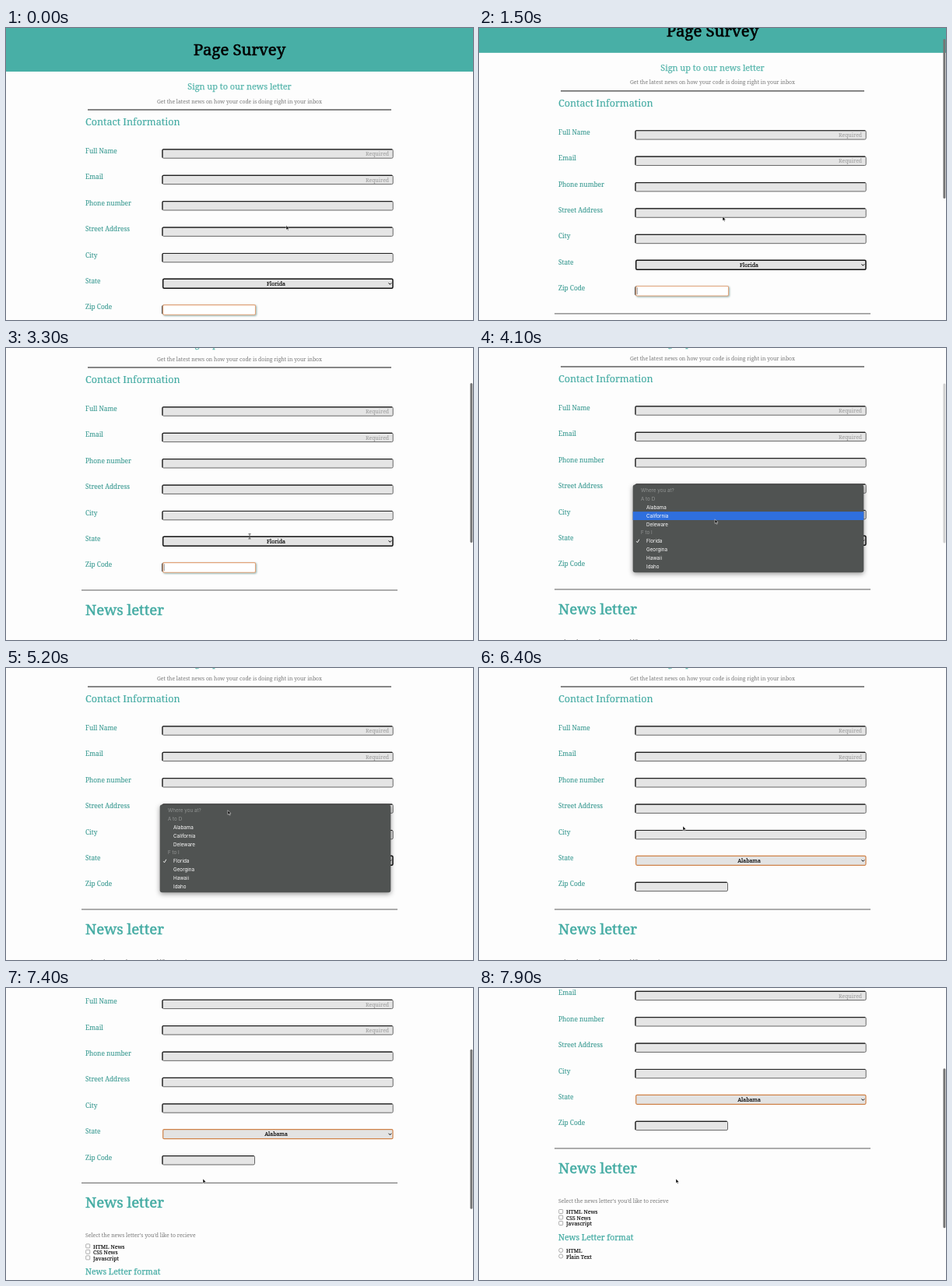
Write an HTML page that moves like this. It is 600 by 375 pixels and loops after 8000 ms.

```html
<!DOCTYPE html>
<html lang="en">
<head>
<meta charset="utf-8">
<title>Newsletter form</title>
<style>
html, body { margin: 0; width: 100%; height: 100%; overflow: hidden; background: #fdfdfd; }
svg { display: block; width: 600px; height: 375px; }
text { font-family: "Noto Serif", serif; white-space: pre; }
#menu text { font-family: Inter, Roboto, sans-serif; font-size: 6.3px; }
#menu > rect:first-child { filter: drop-shadow(0 2px 3px #0006); }
#focus > rect:first-child { filter: drop-shadow(1px 1px 1px #2f6f6a88); }
</style>
</head>
<body>
<svg id="stage" viewBox="0 0 600 375"></svg>
<script>
const TEAL = '#46aca4', LABEL = '#3a9a92', GRAY = '#777';
const LOOP = 8000, ROW = 33.4, MENU_TOP = 177.6, MENU_ROW = 10.85;

const text = (x, y, size, fill, str, { anchor = 'start', weight = 0, id = '' } = {}) =>
  `<text id="${id}" x="${x}" y="${y}" font-size="${size}" fill="${fill}" text-anchor="${anchor}"
    stroke="${fill}" stroke-width="${weight}">${str}</text>`;
const rect = (x, y, w, h, attrs) => `<rect x="${x}" y="${y}" width="${w}" height="${h}" ${attrs}/>`;

// Inset field: darker on the top and left edges
const field = (y, right) =>
  rect(200.9, y + .5, right - 201.4, 11.4, 'rx="1.6" fill="#e5e5e5" stroke="#666" stroke-width="1"') +
  `<path d="M201 ${y + 11.3}V${y + 1.8}Q201 ${y + .6} 202.2 ${y + .6}H${right - 1.5}"
    fill="none" stroke="#222" stroke-width="1.2"/>`;

const labels = ['Full Name', 'Email', 'Phone number', 'Street Address', 'City', 'State', 'Zip Code'];

function page() {
  const mid = { anchor: 'middle' };
  let s = rect(0, 0, 600, 56, `fill="#48afa6"`) +
    text(300, 35, 20.3, '#000', 'Page Survey', { ...mid, weight: .6 }) +
    text(300, 79.4, 10.9, '#58b6ad', 'Sign up to our news letter', { ...mid, weight: .25 }) +
    text(300, 96.6, 6.83, GRAY, 'Get the latest news on how your code is doing right in your inbox', mid) +
    rect(105, 104.3, 390, 1.4, 'fill="#555"') +
    text(102, 125, 12.55, TEAL, 'Contact Information', { weight: .15 });

  labels.forEach((label, i) => {
    const y = 155.3 + ROW * i;
    s += text(102, y + 5.6, 8.3, LABEL, label, { weight: .1 });
    if (i !== 5) s += field(y, i === 6 ? 320 : 497.7);
    if (i < 2) s += text(492, y + 8.9, 6.85, '#999', 'Required', { anchor: 'end' });
  });

  s += rect(201.7, 322.3, 295.3, 12, 'id="select" rx="1.5" fill="#e3e3e3"') +
    text(347, 330.8, 6.98, '#000', 'Florida', { ...mid, weight: .15, id: 'state' }) +
    '<path d="M491.6 327.4l1.8 1.9 1.8-1.9" fill="none" stroke="#000" stroke-width="1"/>' +
    '<g id="focus">' +
    rect(201.7, 355.6, 118.8, 12.6, 'rx="1.5" fill="#fff" stroke="#e2a47a" stroke-width="1.1"') +
    rect(202.8, 357.3, .6, 9, 'id="caret" fill="#444"') + '</g>' +
    rect(97, 390.4, 406, 1.2, 'fill="#777"') +
    text(102, 422.7, 18.6, TEAL, 'News letter', { weight: .5 }) +
    text(102, 461, 6.9, GRAY, "Select the news letter's you'd like to recieve");

  ['HTML News', 'CSS News', 'Javascript'].forEach((name, i) => {
    const y = 475.4 + 7.5 * i;
    s += rect(102.7, y - 5.9, 5, 5, 'rx=".8" fill="#fff" stroke="#777" stroke-width=".6"') +
      text(112, y, 6.95, '#000', name, { weight: .12 });
  });
  s += text(102, 508.8, 10.4, TEAL, 'News Letter format', { weight: .25 });
  ['HTML', 'Plain Text'].forEach((name, i) => {
    const y = 525.2 + 7.5 * i;
    s += `<circle cx="105.2" cy="${y - 3.3}" r="2.6" fill="#fff" stroke="#777" stroke-width=".6"/>` +
      text(112, y, 6.95, '#000', name, { weight: .12 });
  });
  return s;
}

const items = ['Where you at?', 'A to D', 'Alabama', 'California', 'Deleware', 'F to I',
  'Florida', 'Georgina', 'Hawaii', 'Idaho'];
const disabled = i => [0, 1, 5].includes(i);

const menu = () =>
  rect(197.7, 175.4, 296.6, 112.8, 'rx="3" fill="#505352"') +
  rect(197.7, 0, 296.6, MENU_ROW, 'id="hover" fill="#2f6fde"') +
  items.map((item, i) => text(disabled(i) ? 208 : 215, MENU_TOP + MENU_ROW * (i + .5) + 2.2, 6.3,
    disabled(i) ? '#929594' : '#fff', item)).join('') +
  '<path d="M202.2 248.2l1.3 1.6 2.4-4" fill="none" stroke="#fff" stroke-width=".9"/>';

const $ = id => document.getElementById(id);
$('stage').innerHTML = `<g id="page">${page()}</g>` +
  rect(596.4, 0, 3, 205, 'id="bar" rx="1.5" fill="#757575"') +
  `<g id="menu">${menu()}</g><g id="cursor">
    <path id="arrow" d="M0 0V5.6L1.3 4.5 2.2 6.5 3.1 6.1 2.2 4.2H4Z" fill="#000" stroke="#fff" stroke-width=".5"/>
    <path id="beam" d="M-1.6 -3.2H1.6M0 -3.2V3M-1.6 3H1.6M-.8 .8H.8" fill="none" stroke="#444" stroke-width=".8"/>
  </g>`;

// Keys are [time, value]; eased between neighbours
function track(keys, t, ease = p => p) {
  let i = 1;
  while (i < keys.length - 1 && t > keys[i][0]) i++;
  const [t0, a] = keys[i - 1], [t1, b] = keys[i];
  const p = Math.min(1, Math.max(0, (t - t0) / (t1 - t0)));
  return a + (b - a) * ease(p);
}
const smooth = p => p * p * (3 - 2 * p);

const scroll = [[950, 0], [1450, 24], [1850, 25], [2300, 51.5], [2750, 53], [3250, 80],
  [3700, 80], [3800, 81], [6650, 81], [7000, 105], [7900, 185]];
const cursorX = [[100, 360], [800, 313], [3800, 313], [4500, 288], [5100, 285], [5500, 285],
  [6000, 262], [6400, 262], [6650, 253]];
const cursorY = [[100, 253.6], [800, 242], [3800, 242], [4500, 186], [5100, 182.7], [5500, 182.7],
  [6000, 203], [6400, 203], [6650, 245]];
const barAlpha = [[950, 0], [1050, 1], [3900, 1], [4200, 0], [6600, 0], [6700, 1]];

const show = (id, on) => $(id).setAttribute('visibility', on ? 'inherit' : 'hidden');
const move = (id, x, y) => $(id).setAttribute('transform', `translate(${x} ${y})`);

function draw(t) {
  const top = track(scroll, t), x = track(cursorX, t, smooth), y = track(cursorY, t, smooth);
  const picked = t >= 6400, open = t >= 4000 && !picked;
  move('page', 0, -top);
  move('bar', 0, top * .556 + .5);
  $('bar').setAttribute('opacity', track(barAlpha, t));

  show('focus', t < 4000);
  show('caret', t < 4000 && t % 1000 >= 150 && t % 1000 < 650);
  $('state').textContent = picked ? 'Alabama' : 'Florida';
  $('select').setAttribute('stroke', picked ? '#cf8248' : '#111');
  $('select').setAttribute('stroke-width', picked ? 1.2 : 1.5);

  const row = Math.floor((y - MENU_TOP) / MENU_ROW);
  $('menu').setAttribute('visibility', open ? 'visible' : 'hidden');
  show('hover', open && items[row] && !disabled(row));
  $('hover').setAttribute('y', MENU_TOP + MENU_ROW * row);

  const beam = t >= 2900 && t < 3700;
  show('beam', beam);
  show('arrow', !beam);
  move('cursor', x, y);
}

const start = performance.now();
function tick() {
  draw((performance.now() - start) % LOOP);
  requestAnimationFrame(tick);
}
tick();
</script>
</body>
</html>
```
